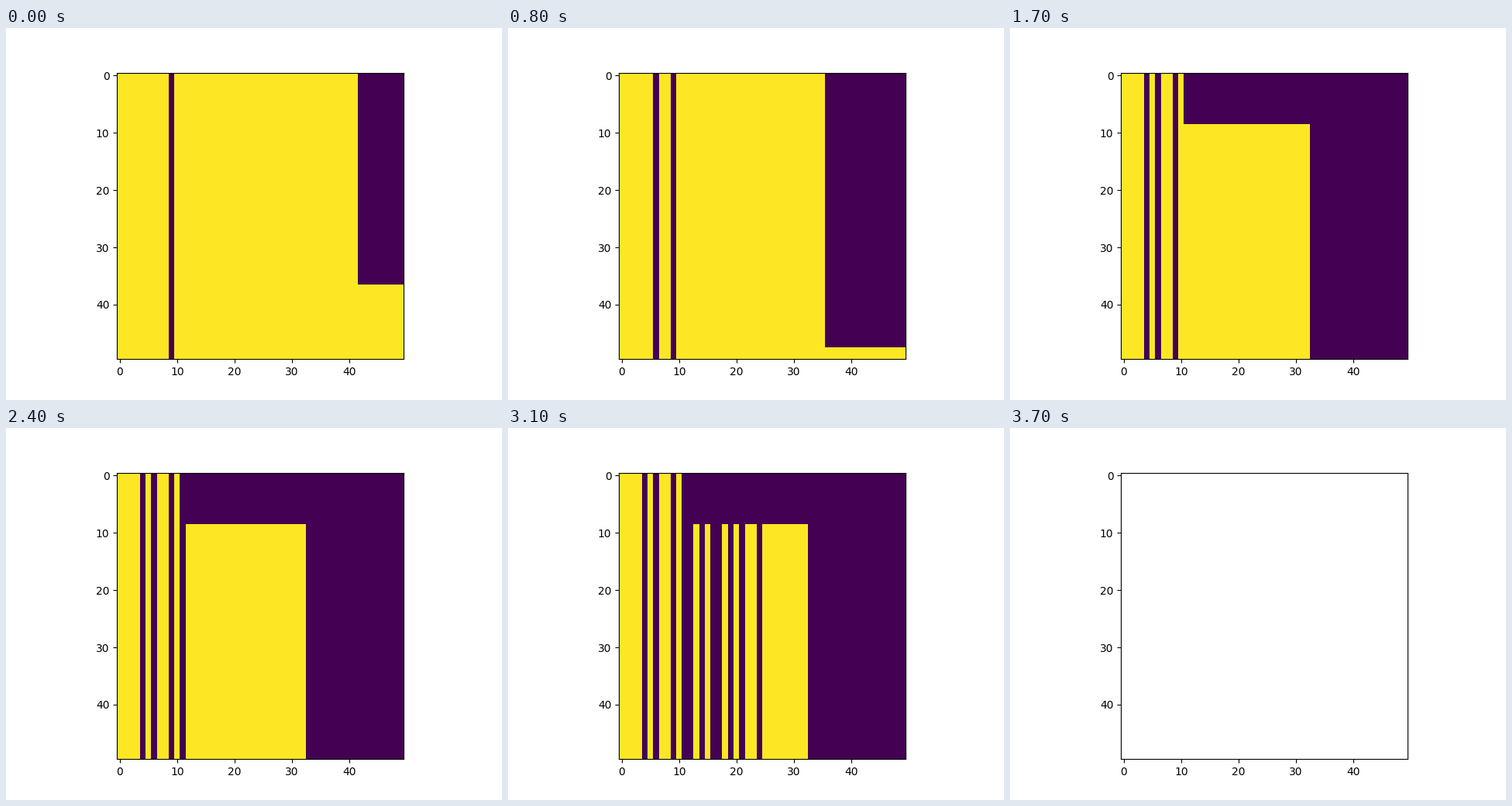
Write a matplotlib script that moves like this. It is 640x480 px and loops after 3800 ms.

```python
import matplotlib.pyplot as plt
import numpy as np
from matplotlib.animation import FuncAnimation

SIZE = 50
STEP_MS = 100
FRAMES = 38

# (step, first column, end column, end row): cells ruled out from the top down
CUTS = [
    (0, 9, 10, SIZE),
    (0, 42, SIZE, 37),
    (5, 40, SIZE, 42),
    (6, 39, SIZE, 48),
    (8, 6, 7, SIZE),
    (8, 36, SIZE, 48),
    (10, 36, SIZE, SIZE),
    (13, 4, 5, SIZE),
    (14, 33, SIZE, SIZE),
    (15, 11, SIZE, 5),
    (17, 11, SIZE, 9),
]
# single columns ruled out one per step
SWEEP_START = 24
SWEEP = [11, 12, 14, 16, 17, 19, 21, 24]
CUTS += [(SWEEP_START + i, col, col + 1, SIZE) for i, col in enumerate(SWEEP)]
# everything but one column
CUTS += [(36, 0, 22, SIZE), (36, 23, SIZE, SIZE)]
CLEAR_STEP = 37


def grid_at(step):
    if step >= CLEAR_STEP:
        return np.full((SIZE, SIZE), np.nan)
    grid = np.ones((SIZE, SIZE))
    for start, left, right, bottom in CUTS:
        if step >= start:
            grid[:bottom, left:right] = 0
    return grid


fig, ax = plt.subplots(figsize=(6.4, 4.8), dpi=100)
image = ax.imshow(grid_at(0), cmap="viridis", vmin=0, vmax=1,
                  interpolation="nearest")


def update(step):
    image.set_data(grid_at(step))
    return [image]


anim = FuncAnimation(fig, update, frames=FRAMES, interval=STEP_MS,
                     repeat=True, repeat_delay=0)
plt.show()
```
